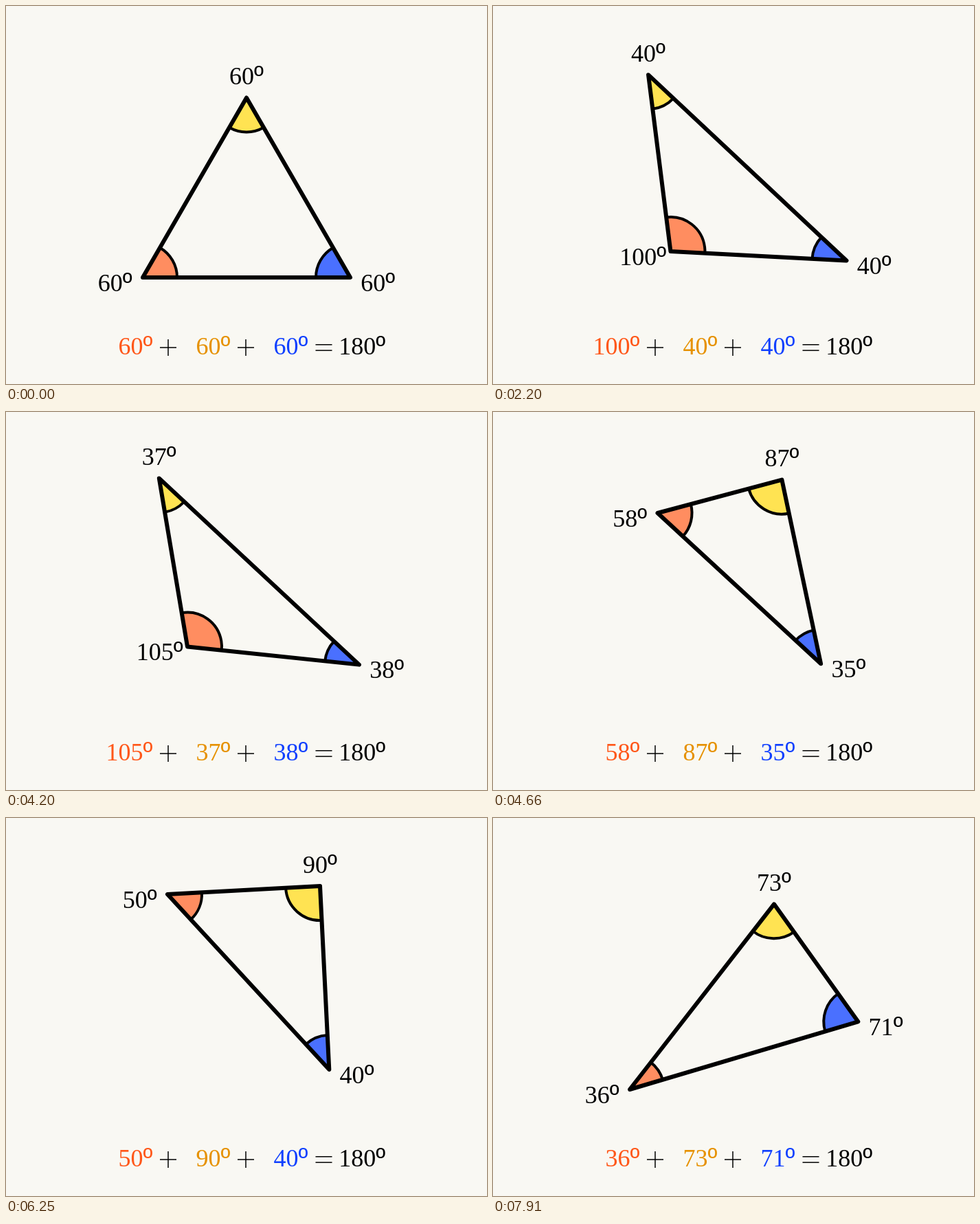
An HTML page with a canvas that plays this animation: 700 px wide and 550 px high, repeating every 8000 ms.

```html
<!DOCTYPE html>
<html lang="en">
<head>
<meta charset="utf-8">
<title>Angles of a triangle</title>
<style>
  html, body { margin: 0; width: 100%; height: 100%; overflow: hidden; background: #f9f8f3; }
  canvas { display: block; width: 700px; height: 550px; }
</style>
</head>
<body>
<canvas id="stage" width="700" height="550"></canvas>
<script>
const ctx = document.getElementById('stage').getContext('2d');

const LOOP = 8000, FPS = 24;
const FIRST_MOVE = 1500, PERIOD = 2500, MOVE = 1000;
const DIGIT = 18, RING = 14;

// Corners in clockwise order: left, top, right.
const POSES = [
  [[199, 395], [350, 133.5], [501, 395]],
  [[265.4, 352.6], [211.6, 96.3], [516, 367.7]],
  [[235, 111], [457, 99], [470.3, 366]],
  [[199, 395], [409, 125.3], [531.3, 296.3]]
];

const CORNERS = [
  { fill: '#ff8d60', ink: '#ff5719', label: [-40.3, 19.7], sumRight: 199.5 },
  { fill: '#ffe352', ink: '#e69100', label: [0, -19.5], sumRight: 312.5 },
  { fill: '#4a70ff', ink: '#1040ff', label: [40.3, 19.7], sumRight: 425.5 }
];

// cubic-bezier(.65, 0, .35, 1), solved by bisection
function ease(x) {
  if (x <= 0) return 0;
  if (x >= 1) return 1;
  let lo = 0, hi = 1;
  for (let i = 0; i < 24; i++) {
    const s = (lo + hi) / 2, r = 1 - s;
    const bx = 1.95 * r * r * s + 1.05 * r * s * s + s * s * s;
    if (bx < x) lo = s; else hi = s;
  }
  return lo * lo * (3 - 2 * lo);
}

function cornersAt(t) {
  if (t < FIRST_MOVE) return POSES[0];
  const since = t - FIRST_MOVE;
  const move = Math.floor(since / PERIOD);
  const k = ease((since % PERIOD) / MOVE);
  const to = POSES[move + 1];
  return POSES[move].map((p, i) => p.map((v, axis) => v + (to[i][axis] - v) * k));
}

const heading = (from, to) => Math.atan2(to[1] - from[1], to[0] - from[0]);

function spanAt(points, i) {
  const start = heading(points[i], points[(i + 1) % 3]);
  const end = heading(points[i], points[(i + 2) % 3]);
  const turn = 2 * Math.PI;
  return { start, end, size: (end - start + turn) % turn };
}

function drawDegrees(value, right, baseline, color) {
  ctx.fillStyle = color;
  ctx.font = '36px "Liberation Serif", serif';
  ctx.textAlign = 'right';
  ctx.fillText(value, right, baseline);
  ctx.font = '38px "Liberation Sans", sans-serif';
  ctx.textAlign = 'center';
  ctx.fillText('º', right + RING / 2, baseline);
}

function drawLabel(value, cx, baseline) {
  const width = String(value).length * DIGIT + RING;
  drawDegrees(value, cx + width / 2 - RING, baseline, '#000');
}

function drawSector([x, y], { start, end }, fill) {
  ctx.beginPath();
  ctx.moveTo(x, y);
  ctx.arc(x, y, 50, start, end);
  ctx.closePath();
  ctx.fillStyle = fill;
  ctx.fill();
  ctx.beginPath();
  ctx.arc(x, y, 50, start, end);
  ctx.lineWidth = 4;
  ctx.stroke();
}

function drawTriangle(points) {
  ctx.beginPath();
  points.forEach(p => ctx.lineTo(...p));
  ctx.closePath();
  ctx.lineWidth = 6;
  ctx.lineJoin = 'round';
  ctx.stroke();
}

function drawSum(values) {
  CORNERS.forEach((c, i) => drawDegrees(values[i], c.sumRight, 506.5, c.ink));
  drawDegrees(180, 538.3, 506.5, '#000');
  ctx.fillStyle = '#000';
  for (const x of [236, 349]) {
    ctx.fillRect(x - 12, 496.2, 24, 1.5);
    ctx.fillRect(x - 0.75, 485, 1.5, 24);
  }
  for (const y of [492, 500.4]) ctx.fillRect(450.5, y, 24, 1.5);
}

function draw(t) {
  const points = cornersAt(t);
  const spans = points.map((_, i) => spanAt(points, i));
  const [left, top] = spans.map(s => Math.round(s.size * 180 / Math.PI));
  const values = [left, top, 180 - left - top];

  ctx.fillStyle = '#f9f8f3';
  ctx.fillRect(0, 0, 700, 550);
  ctx.strokeStyle = '#000';
  points.forEach((p, i) => drawSector(p, spans[i], CORNERS[i].fill));
  drawTriangle(points);
  points.forEach(([x, y], i) => {
    const [dx, dy] = CORNERS[i].label;
    drawLabel(values[i], x + dx, y + dy);
  });
  drawSum(values);
}

// Steps at 24 fps, with step times cut to 10 ms.
function stepTime(t) {
  const step = Math.ceil((Math.floor(t / 10) * 10 + 10) * FPS / 1000) - 1;
  return step * 1000 / FPS;
}

const origin = performance.now();
function tick() {
  draw(stepTime((performance.now() - origin) % LOOP));
  requestAnimationFrame(tick);
}
tick();
</script>
</body>
</html>
```
